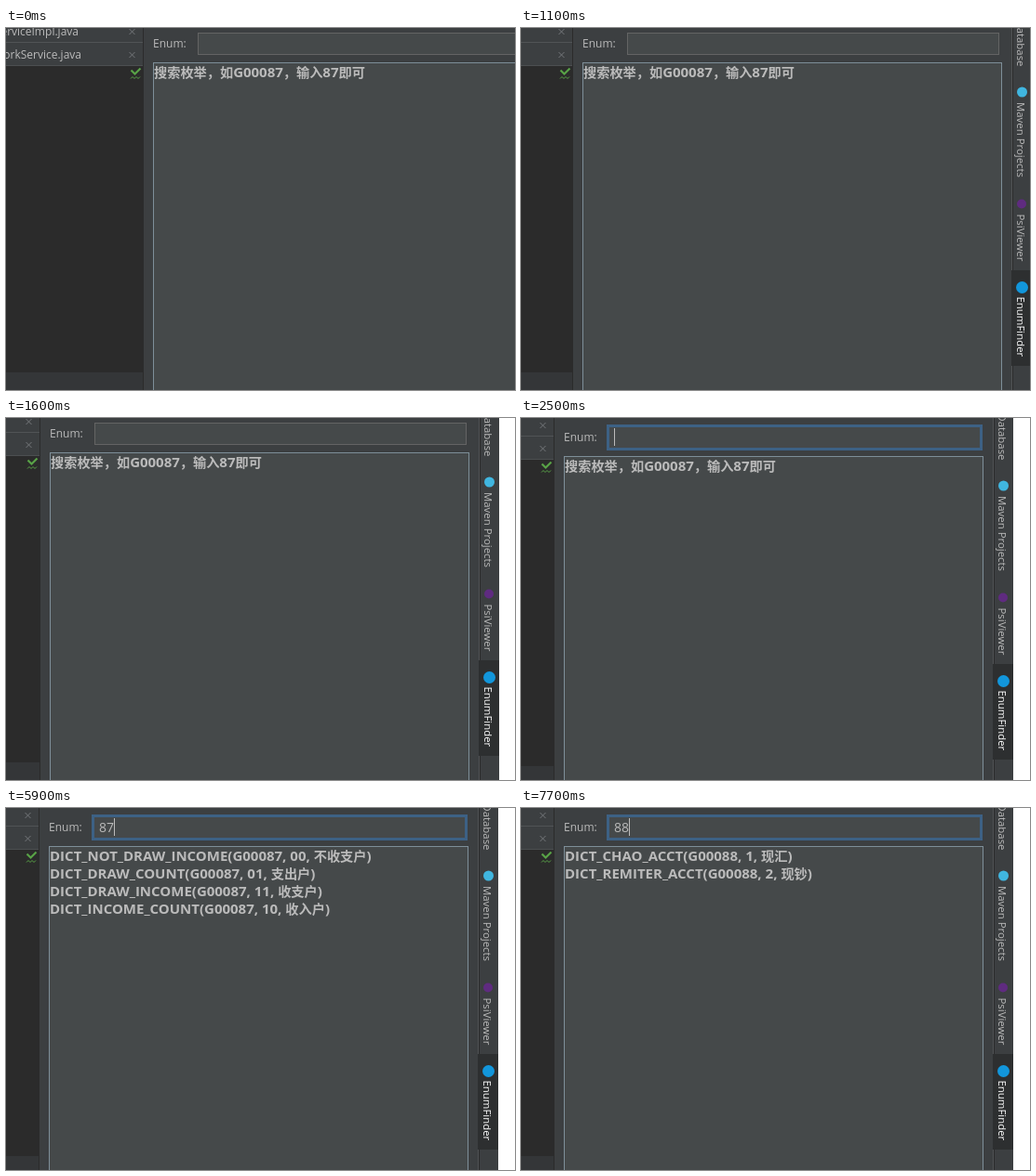
An HTML page with a canvas that plays this animation: 547x390 px, repeating every 8 s.

```html
<!DOCTYPE html>
<html lang="zh">
<head>
<meta charset="utf-8">
<title>Enum search</title>
<style>
html, body { margin: 0; width: 100%; height: 100%; overflow: hidden; background: #fff; }
canvas { display: block; width: 547px; height: 390px; }
</style>
</head>
<body>
<canvas id="stage" width="547" height="390"></canvas>
<script>
const ctx = document.getElementById('stage').getContext('2d');
const W = 547, H = 390, LOOP = 8000;
const LATIN = '"Open Sans", "Noto Sans", sans-serif';
const CJK = '"Noto Sans CJK SC", "Noto Sans CJK", sans-serif';

// [start ms, panel x, vertical shift]
const PAN = [
  [0, 158, 0], [800, 148, 0], [900, 122, 0], [1000, 90, 0], [1100, 66, 0], [1200, 58, 0],
  [1300, 54, 0], [1400, 51, 0], [1500, 49, 0], [1600, 47, 0], [1800, 46, 4]
];

const RESULTS = {
  '': ['搜索枚举，如G00087，输入87即可'],
  '8': ['DICT_Y(G00008, 1, 是)', 'DICT_N(G00008, 0, 否)'],
  '87': [
    'DICT_NOT_DRAW_INCOME(G00087, 00, 不收支户)',
    'DICT_DRAW_COUNT(G00087, 01, 支出户)',
    'DICT_DRAW_INCOME(G00087, 11, 收支户)',
    'DICT_INCOME_COUNT(G00087, 10, 收入户)'
  ],
  '88': ['DICT_CHAO_ACCT(G00088, 1, 现汇)', 'DICT_REMITER_ACCT(G00088, 2, 现钞)']
};

const TYPING = [[0, ''], [4200, '8'], [5000, '87'], [7200, '8'], [7700, '88']];
const FOCUS_AT = 2500;
const CARET = [
  [0, false], [2500, true], [3000, false], [3400, true], [3900, false], [4200, true],
  [4600, false], [5000, true], [5400, false], [5900, true], [6400, false], [6800, true],
  [7600, false], [7700, true]
];

const at = (track, t) => track.filter(key => key[0] <= t).pop();

function rect(x, y, w, h, color) {
  ctx.fillStyle = color;
  ctx.fillRect(x, y, w, h);
}

function box(x, y, w, h, border, fill, line = 1) {
  rect(x, y, w, h, border);
  rect(x + line, y + line, w - 2 * line, h - 2 * line, fill);
}

function disc(x, y, r, color) {
  ctx.fillStyle = color;
  ctx.beginPath();
  ctx.arc(x, y, r, 0, Math.PI * 2);
  ctx.fill();
}

function stroke(points, color, width) {
  ctx.strokeStyle = color;
  ctx.lineWidth = width;
  ctx.beginPath();
  points.forEach(([x, y]) => ctx.lineTo(x, y));
  ctx.stroke();
}

function label(str, x, y, size = 12, color = '#bbbbbb', align = 'left') {
  ctx.font = `${size}px ${LATIN}`;
  ctx.fillStyle = color;
  ctx.textAlign = align;
  ctx.fillText(str, x, y);
}

// Chinese glyphs sit slightly smaller than the Latin ones.
function boldLine(str, x, y) {
  ctx.fillStyle = '#bbbbbb';
  ctx.textAlign = 'left';
  for (const run of str.match(/[\x00-\x7f]+|[^\x00-\x7f]+/g)) {
    ctx.font = run.charCodeAt(0) < 128 ? `bold 15px ${LATIN}` : `bold 14.2px ${CJK}`;
    ctx.fillText(run, x, y);
    x += ctx.measureText(run).width;
  }
}

function sideLabel(str, x, y, color, align) {
  ctx.save();
  ctx.translate(x, y);
  ctx.rotate(Math.PI / 2);
  label(str, 0, 0, 11.4, color, align);
  ctx.restore();
}

function closeMark(x, y) {
  stroke([[x - 3, y - 3], [x + 3, y + 3]], '#74777a', 1);
  stroke([[x - 3, y + 3], [x + 3, y - 3]], '#74777a', 1);
}

// Everything below is laid out from the left edge of the result list.
function drawEditor() {
  rect(-170, -10, 159, 50, '#3c3f41');
  rect(-170, 15, 159, 1, '#515456');
  rect(-170, 40, 159, 1, '#4c4f51');
  rect(-170, 41, 159, 330, '#2b2b2b');
  rect(-170, 371, 159, 30, '#343638');
  rect(-11, -10, 1, 410, '#2b2b2b');
  label('erviceImpl.java', -80, 8, 12, '#bbbbbb', 'right');
  label('orkService.java', -77, 33, 12, '#bbbbbb', 'right');
  closeMark(-22.5, 4);
  closeMark(-22.5, 29);
  stroke([[-23.5, 45.5], [-19.5, 49.5], [-13.5, 43.5]], '#59a347', 2.2);
  stroke([[-24, 54.5], [-22, 52.5], [-20, 54.5], [-18, 52.5], [-16, 54.5], [-14, 52.5]], '#59a347', 1);
}

function drawSidebar() {
  rect(461, -10, 1, 410, '#515456');
  rect(462, -10, 1, 410, '#2b2b2b');
  rect(461, 261, 22, 103, '#2d2f30');
  sideLabel('Database', 467, 41.5, '#bbbbbb', 'right');
  sideLabel('Maven Projects', 467, 80, '#bbbbbb');
  sideLabel('PsiViewer', 467, 200.5, '#bbbbbb');
  sideLabel('EnumFinder', 467, 289.5, '#ffffff');
  disc(472.5, 69, 5.5, '#40b6e0');
  disc(472, 189.5, 5, '#5f2b80');
  disc(472.5, 279.5, 6.5, '#1296db');
}

function drawPanel(t) {
  const query = at(TYPING, t)[1];
  label('Enum:', 0, 21);
  if (t >= FOCUS_AT) {
    box(46, 3, 404, 28, '#3d6185', '#45494a', 3);
  } else {
    box(48, 5, 400, 24, '#646464', '#45494a');
  }
  label(query, 54, 22, 14);
  if (at(CARET, t)[1]) rect(54 + 8 * query.length, 7, 1, 19, '#bbbbbb');

  box(0, 37, 451, 380, '#7e8f99', '#45494a');
  RESULTS[query].forEach((line, i) => boldLine(line, 1, 53 + 19 * i));
}

function draw(t) {
  const [, x, y] = at(PAN, t);
  rect(0, 0, W, H, '#ffffff');
  ctx.save();
  ctx.translate(x, y);
  rect(-170, -10, 653, 420, '#3c3f41');
  drawEditor();
  drawPanel(t);
  drawSidebar();
  ctx.restore();
}

const start = performance.now();
function tick() {
  draw((performance.now() - start) % LOOP);
  requestAnimationFrame(tick);
}
tick();
</script>
</body>
</html>
```
